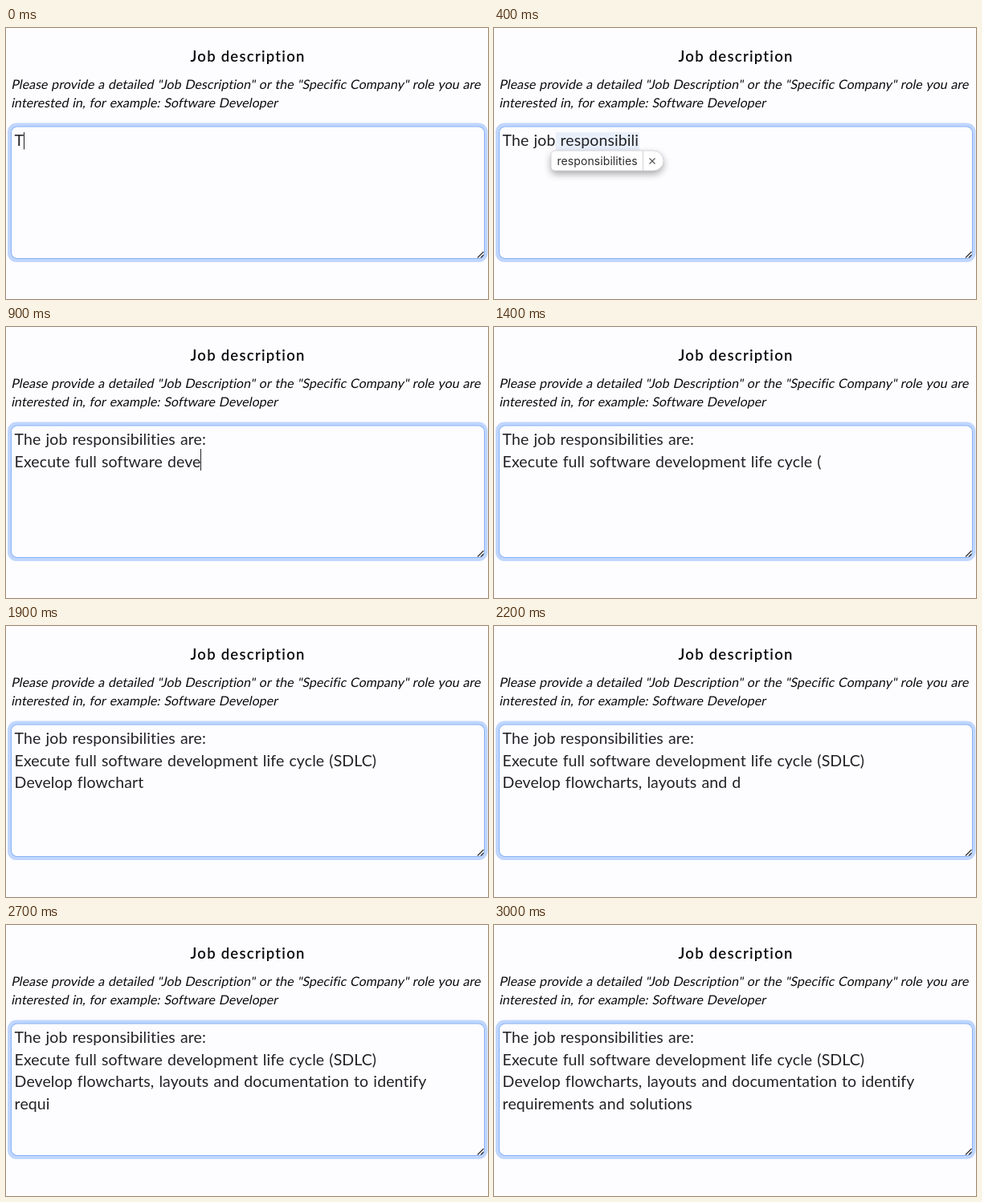
Animation of 600 by 338 pixels, one loop 3.1 s. Source, as an HTML page with a canvas:

```html
<!DOCTYPE html>
<html lang="en">
<head>
<meta charset="utf-8">
<title>Job description</title>
<style>
  html, body { margin: 0; width: 100%; height: 100%; overflow: hidden; background: #fdfcff; }
  canvas { display: block; width: 600px; height: 338px; }
</style>
</head>
<body>
<canvas id="stage"></canvas>
<script>
const canvas = document.getElementById('stage');
const ctx = canvas.getContext('2d');
const ratio = window.devicePixelRatio || 1;
canvas.width = 600 * ratio;
canvas.height = 338 * ratio;

const LOOP = 3100, STEP = 100;
const PAPER = '#fdfcff', INK = '#222226';
const SANS = 'Lato, "Open Sans", sans-serif';
const FULL = [
  'The job responsibilities are:',
  'Execute full software development life cycle (SDLC)',
  'Develop flowcharts, layouts and documentation to identify',
  'requirements and solutions'
].join('\n');

// [step, characters typed]
const TYPING = [[0, 1], [2, 13], [3, 13], [4, 20], [9, 56], [14, 76],
                [15, 80], [19, 99], [25, 131], [30, FULL.length]];

function typedAt(step) {
  const i = Math.max(1, TYPING.findIndex(k => k[0] >= step));
  const [s0, n0] = TYPING[i - 1], [s1, n1] = TYPING[i];
  return Math.round(n0 + (n1 - n0) * (step - s0) / (s1 - s0));
}

function setType(font, gap = 0, wordGap = 0) {
  ctx.font = font;
  ctx.letterSpacing = gap + 'px';
  ctx.wordSpacing = wordGap + 'px';
}

function oblique(text, x, y) {
  ctx.save();
  ctx.transform(1, 0, -0.2, 1, x, y);
  ctx.fillText(text, 0, 0);
  ctx.restore();
}

function roundBox(x, y, w, h, r, fill) {
  ctx.beginPath();
  ctx.roundRect(x, y, w, h, r);
  ctx.fillStyle = fill;
  ctx.fill();
}

function line(x0, y0, x1, y1, color, width = 1) {
  ctx.beginPath();
  ctx.moveTo(x0, y0);
  ctx.lineTo(x1, y1);
  ctx.strokeStyle = color;
  ctx.lineWidth = width;
  ctx.stroke();
}

function drawForm() {
  ctx.fillStyle = PAPER;
  ctx.fillRect(0, 0, 600, 338);

  ctx.fillStyle = '#0b0b0d';
  setType('600 18.5px ' + SANS, 1.25);
  ctx.fillText('Job description', 229.5, 42.3);
  setType('16px ' + SANS, 0.05, 0.6);
  oblique('Please provide a detailed "Job Description" or the "Specific Company" role you are', 6.2, 75.5);
  oblique('interested in, for example: Software Developer', 6.2, 98.5);

  roundBox(2, 118.5, 597.5, 173.5, 11, '#c0d6fd');
  roundBox(6, 122.5, 590, 165.5, 8, '#86b3f6');
  roundBox(7, 123.5, 588, 163.5, 7, PAPER);
  line(587, 286.5, 594.5, 279, '#333', 1.2);
  line(591, 286.5, 594.5, 283, '#333', 1.2);
}

function drawSuggestion() {
  ctx.save();
  ctx.shadowColor = 'rgba(0,0,0,.35)';
  ctx.shadowBlur = 10 * ratio;
  ctx.shadowOffsetY = 4 * ratio;
  roundBox(71, 153, 140, 25, [5, 12.5, 12.5, 5], '#fff');
  ctx.restore();
  ctx.strokeStyle = '#cfcfd3';
  ctx.lineWidth = 0.8;
  ctx.stroke();

  ctx.fillStyle = '#2c2c2e';
  setType('14px Inter, Roboto, sans-serif', 0.08);
  ctx.fillText('responsibilities', 78.5, 170.5);
  line(185.5, 153.5, 185.5, 177.5, '#d2d2d6');
  line(193.5, 162.5, 200.5, 169.5, '#5c5c60', 1.3);
  line(200.5, 162.5, 193.5, 169.5, '#5c5c60', 1.3);
}

function drawTyping(step) {
  const count = typedAt(step);
  const rows = FULL.slice(0, count).split('\n');
  const suggesting = count > 16 && count < 24;

  if (suggesting) {
    ctx.fillStyle = '#e9f0fb';
    ctx.fillRect(77, 130, 104, 23);
  }
  let end = 0;
  ctx.fillStyle = INK;
  setType('19.5px ' + SANS, 0.1, 1);
  rows.forEach((text, i) => {
    ctx.fillText(text, 10.6, 147 + i * 27.5);
    end = 10.6 + ctx.measureText(text).width;
  });
  if (suggesting) {
    drawSuggestion();
  } else if (step % 8 < 3) {
    const base = 147 + (rows.length - 1) * 27.5;
    const x = Math.round(end) + 0.5;
    line(x, Math.max(130, base - 22.5), x, base + 4.5, INK);
  }
}

function frame() {
  const step = Math.floor(performance.now() % LOOP / STEP);
  ctx.setTransform(ratio, 0, 0, ratio, 0, 0);
  drawForm();
  drawTyping(step);
  requestAnimationFrame(frame);
}
frame();
</script>
</body>
</html>
```
